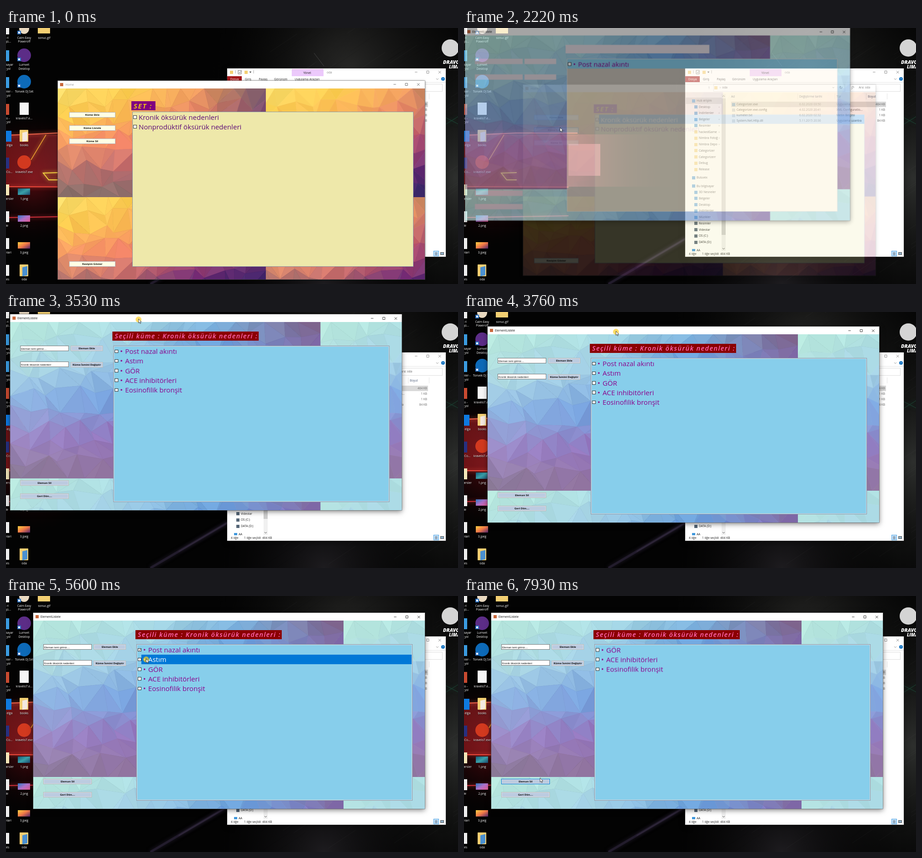
These frames come from a looping animation (995 by 563 pixels, 8 s). An HTML page with a canvas:

```html
<!DOCTYPE html>
<html lang="tr">
<head>
<meta charset="utf-8">
<title>Küme</title>
<style>
html, body { margin: 0; width: 100%; height: 100%; overflow: hidden; background: #000; }
div, canvas, svg { position: absolute; box-sizing: border-box; }
svg { left: 0; top: 0; overflow: visible; fill: none; }
#stage { left: 0; top: 0; width: 995px; height: 563px; overflow: hidden; font: 6.5px "Open Sans", "Noto Sans", sans-serif; color: #222; }
.text { white-space: pre; line-height: 0; }
.center { transform: translateX(-50%); }
.right { transform: translateX(-100%); }
.desk { color: #fff; text-shadow: 0 1px 1px #000; }
.shadow { box-shadow: 0 3px 11px rgba(0,0,0,.5), 0 0 0 .5px #666; }
.button { border: 1px solid #b9b9b9; box-shadow: inset 0 0 0 .5px #eee; font-weight: 700; font-size: 6px; color: #111; }
.field { background: #fff; border: 1px solid #777; font: 6px "Liberation Sans", sans-serif; color: #111; }
.focus { border: 1.5px solid #0078d7; }
.list { overflow: hidden; font-size: 15.1px; }
.tick { background: #fff; border: 1px solid #333; }
.banner { font-style: italic; font-weight: 600; }
</style>
</head>
<body>
<div id="stage"></div>
<script>
const LOOP = 8000, HOLD = 77;
const stage = document.getElementById('stage');

function box(parent, x, y, w, h, css = '', cls = '') {
  const el = document.createElement('div');
  el.className = cls;
  el.style.cssText = `left:${x}px;top:${y}px;width:${w}px;height:${h}px;${css}`;
  parent.append(el);
  return el;
}
function text(parent, x, y, str, css = '', cls = '') {
  const el = document.createElement('div');
  el.className = 'text ' + cls;
  el.style.cssText = `left:${x}px;top:${y}px;${css}`;
  el.textContent = str;
  parent.append(el);
  return el;
}
function shape(parent, x, y, d, css) {
  const el = box(parent, x, y, 1, 1);
  el.innerHTML = `<svg width="1" height="1"><path d="${d}" style="${css}"/></svg>`;
  return el;
}
function canvas(parent, x, y, w, h) {
  const el = document.createElement('canvas');
  el.width = w; el.height = h;
  el.style.cssText = `left:${x}px;top:${y}px`;
  if (parent) parent.append(el);
  return el.getContext('2d');
}

function track(el, frames) {
  el.animate(frames.map(([time, props], i) => {
    const next = frames[i + 1];
    const steps = next ? Math.max(1, Math.round((next[0] - time) / HOLD)) : 1;
    return { ...props, offset: time / LOOP, easing: `steps(${steps})` };
  }), { duration: LOOP, iterations: Infinity });
}
function during(el, ...spans) {
  const inside = time => +spans.some(([from, to]) => time >= from && time < to);
  const times = [...new Set([0, ...spans.flat(), LOOP])];
  el.animate(times.map(time => ({ opacity: inside(time), offset: time / LOOP, easing: 'step-end' })),
    { duration: LOOP, iterations: Infinity });
  return el;
}

function random(seed) {
  return () => (seed = (seed * 16807) % 2147483647) / 2147483647;
}
const rgb = hex => [1, 3, 5].map(i => parseInt(hex.slice(i, i + 2), 16));
const mix = (a, b, k) => a.map((v, i) => v + (b[i] - v) * k);

function sample(rows, u, v) {
  const fx = u * (rows[0].length - 1), fy = v * (rows.length - 1);
  const x = Math.min(Math.floor(fx), rows[0].length - 2), y = Math.min(Math.floor(fy), rows.length - 2);
  const across = row => mix(row[x], row[x + 1], fx - x);
  return mix(across(rows[y]), across(rows[y + 1]), fy - y);
}
function lowPoly(w, h, cell, palette, seed) {
  const g = canvas(null, 0, 0, w, h), rnd = random(seed);
  const rows = palette.map(line => line.split(' ').map(rgb));
  const nx = Math.round(w / cell), ny = Math.round(h / cell);
  const jitter = (i, n) => (i + (i > 0 && i < n ? (rnd() - .5) * .8 : 0)) / n;
  const grid = Array.from({ length: ny + 1 }, (_, j) =>
    Array.from({ length: nx + 1 }, (_, i) => [jitter(i, nx) * w, jitter(j, ny) * h]));
  const triangle = pts => {
    const [cx, cy] = [0, 1].map(k => pts.reduce((s, p) => s + p[k], 0) / 3);
    const shade = (rnd() - .5) * 13;
    g.fillStyle = g.strokeStyle = `rgb(${sample(rows, cx / w, cy / h).map(c => Math.round(c + shade))})`;
    g.beginPath();
    pts.forEach(p => g.lineTo(...p));
    g.closePath(); g.fill(); g.lineWidth = .7; g.stroke();
  };
  for (let j = 0; j < ny; j++) for (let i = 0; i < nx; i++) {
    const a = grid[j][i], b = grid[j][i + 1], c = grid[j + 1][i + 1], d = grid[j + 1][i];
    const halves = rnd() < .5 ? [[a, b, c], [a, c, d]] : [[a, b, d], [b, c, d]];
    halves.forEach(triangle);
  }
  return g.canvas;
}

function captionButtons(parent, x, y, color) {
  return shape(parent, x, y, 'M0 3h5.5M26 .5h5v5h-5zM52 .5l5.5 5.5m0-5.5l-5.5 5.5', `stroke:${color};stroke-width:.8`);
}
function button(parent, x, y, w, h, label, bg) {
  const el = box(parent, x, y, w, h, `background:${bg}`, 'button');
  text(el, w / 2 - 1, h / 2 - 1, label, '', 'center');
  return el;
}
function checkList(parent, x, y, w, h, css, items) {
  const list = box(parent, x, y, w, h, css, 'list');
  const body = box(list, 0, 0, w, h);
  const rows = items.map((item, i) => {
    const top = i * 21.25;
    text(body, 13, top + 10.5, item);
    const high = box(body, 9, top, w - 11, 21.25, 'background:#0078d7;color:#fff;opacity:0');
    text(high, 4, 10.5, item);
    box(body, 1, top + 7, 7.5, 7.5, '', 'tick');
    const check = shape(body, 2.5, top + 8.5, 'M.5 2.3l1.5 1.5 3-3.3', 'stroke:#222;stroke-width:1');
    check.style.opacity = 0;
    return { high, check };
  });
  return { body, rows };
}

function wallpaper() {
  const g = canvas(stage, 0, 0, 995, 563), rnd = random(7);
  const glow = (x, y, r, color) => {
    const grad = g.createRadialGradient(x, y, 0, x, y, r);
    grad.addColorStop(0, color); grad.addColorStop(1, 'transparent');
    g.fillStyle = grad; g.fillRect(0, 0, 995, 563);
  };
  const line = (color, width, ...pts) => {
    g.strokeStyle = g.shadowColor = color; g.lineWidth = width;
    g.beginPath(); pts.forEach(p => g.lineTo(...p)); g.stroke();
  };
  g.fillStyle = '#030303'; g.fillRect(0, 0, 995, 563);
  glow(760, 95, 340, 'rgba(56,56,54,.8)');
  glow(990, 330, 400, 'rgba(56,58,56,.8)');
  glow(700, 563, 260, 'rgba(36,34,38,.8)');
  for (let i = 0; i < 150; i++) {
    const x = 560 + rnd() * 480, y = rnd() * 563;
    line(`rgba(${rnd() < .5 ? '0,0,0' : '130,130,130'},.07)`, 1, [x, y], [x + 60, y - 40]);
  }
  line('rgba(150,150,150,.3)', 1, [678, 55], [700, 84]);
  glow(60, 330, 160, 'rgba(120,14,22,.7)');
  const band = g.createLinearGradient(0, 0, 480, 0);
  band.addColorStop(0, 'rgba(150,26,30,.65)');
  band.addColorStop(.5, 'rgba(150,50,60,.6)');
  band.addColorStop(1, 'transparent');
  g.fillStyle = band; g.fillRect(0, 234, 480, 115);
  g.fillStyle = '#a04858'; g.fillRect(230, 255, 70, 70);
  g.shadowBlur = 9;
  line('#f0644a', 2, [0, 236], [114, 231], [250, 231]);
  line('#f04a3c', 2, [0, 349], [230, 350]);
  line('#d0303a', 2, [0, 417], [230, 413]);
  line('#e8a030', 1.5, [55, 290], [88, 235]);
  line('#f0d040', 2, [116, 318], [82, 319], [94, 334], [116, 334]);
  line('#221c2c', 5, [318, 563], [490, 462]);
  line('#3c3248', 1, [380, 527], [490, 462]);
  line('#1c4636', 1, [966, 213], [995, 195]);
  line('#1c4636', 1, [966, 196], [995, 211]);
  box(stage, 959, 25, 38, 38, 'background:#d4d4d4;border-radius:50%');
  text(stage, 962, 75, 'DRAVONI', 'font:italic 800 11px/0 "Open Sans",sans-serif', 'desk');
  text(stage, 975, 85, 'LIMA', 'font:italic 800 10px/0 "Open Sans",sans-serif', 'desk');
}

function desktopIcons() {
  const folder = (x, y, inner) => {
    box(stage, x - 10, y - 13, 19, 26, 'background:#f3cf72;border-radius:1px');
    box(stage, x - 4, y - 8, 11, 20, `background:${inner};transform:skewY(-12deg)`);
  };
  const round = (y, color) => box(stage, 25, y - 15, 30, 30, `background:${color};border-radius:50%`);
  const thumb = (y, colors) => box(stage, 26, y - 7, 27, 14, `background:linear-gradient(150deg,${colors})`);
  box(stage, 29, -11, 22, 24, 'background:#e8d8c0;border-radius:50%');
  box(stage, 70, -8, 27, 20, 'background:#f3cf72');
  round(60, '#5c2d87');
  round(118, '#0d6ab8');
  box(stage, 30, 164, 20, 27, 'background:#f6f6f6');
  folder(40, 237, '#f4e8e0');
  round(295, '#d2391f');
  thumb(360, '#155a78,#3aa0a8,#1c4a70');
  thumb(419, '#2a78c0,#b070c8,#e05a90');
  thumb(478, '#fbd040,#f07848,#50246a');
  folder(40, 533, '#4a90d0');
  const labels = [[22, 'Calm Easy'], [30, 'Poweroff'], [81, 'Lumvet'], [89.5, 'Desktop'], [140, 'Tonvek DJ Set'],
    [199, 'kravelo7.e...'], [258, 'books'], [317, 'kravelo7.exe'], [376, '1.png'], [435, '2.png'], [494, '3.jpeg'], [553, 'oda']];
  labels.forEach(([y, s]) => text(stage, 40, y, s, '', 'desk center'));
  text(stage, 84, 22, 'sonuc.gif', '', 'desk center');
  const cut = [[22, 6, 'ri'], [30, 11, 'şü...'], [81, 16, 'sayar'], [89.5, 10, 'yol'], [140, 14, 'nler -'], [149, 10, 'yol'],
    [199, 8, 'o -'], [207, 10, 'yol'], [258, 14, 'elga'], [317, 14, 'Co...'], [376, 17, 'ersler'], [435, 5, 'le'], [494, 12, 'nlari'], [553, 7, 'es']];
  cut.forEach(([y, x, s]) => text(stage, x, y, s, '', 'desk right'));
  ['#eee', '#3a9be0', '#3a9be0', '#c84a30', '#0e7ae0', '#283080', '#f3e6b8', '#eee', '#eee', '#eee'].forEach((color, i) =>
    box(stage, -14, -10 + i * 59, i === 4 ? 26 : 21, 24, `background:${color}`));
  [11, 70, 128].forEach(y => box(stage, 25, y - 5, 8, 8, 'background:#fff;border:2px solid #2a70c0'));
}

function explorer() {
  const win = box(stage, 487, 89, 481, 414, 'background:#fff', 'shadow');
  const tab = (x, str, color = '#333') => text(win, x, 24, str, `color:${color}`, 'center');
  const icon = (x, y, color) => box(win, x - 3.5, y - 3.5, 7, 7, `background:${color}`);
  const rect = (x, y, w, h, css) => box(win, x, y, w, h, css);
  icon(9, 8, '#f3cf72'); icon(41, 8, '#f3cf72');
  shape(win, 24, 4, 'M0 0h7v8h-7zM2 4l1.5 2 3-4', 'stroke:#555;stroke-width:.8');
  shape(win, 49, 7, 'M0 0l2 2.5 2-2.5zM-31-3v7M9-3v7', 'stroke:#555;fill:#333;stroke-width:.5');
  rect(142, 1, 70, 16, 'background:#ecc9fb');
  text(win, 176, 9.5, 'Yönet', '', 'center');
  text(win, 219, 8.5, 'oda', 'color:#888');
  captionButtons(win, 413, 5, '#777');
  rect(0, 17, 32, 13, 'background:#a3181b');
  tab(16, 'Dosya', '#fff'); tab(46, 'Giriş'); tab(79, 'Paylaş'); tab(118, 'Görünüm'); tab(176, 'Uygulama Araçları');
  shape(win, 460, 22, 'M0 0l2.5 2.5 2.5-2.5', 'stroke:#777;stroke-width:.8');
  rect(471, 19, 8, 8, 'background:#0e70c0;border-radius:50%');
  text(win, 475, 23.5, '?', 'color:#fff', 'center');
  rect(0, 30, 481, 1, 'background:#e4e4e4');
  rect(62, 34, 290, 16.5, 'border:1px solid #ddd');
  rect(363, 34, 111, 16.5, 'border:1px solid #ddd');
  text(win, 50, 42, '↑', 'font-size:9px;color:#555');
  icon(67, 42, '#f3cf72');
  text(win, 76, 42, '›  oda');
  shape(win, 324, 41, 'M0 0l2 2 2-2M44 2l-2 3M44 2a2 2 0 1 1 2 0', 'stroke:#666;stroke-width:.8');
  text(win, 339, 42, '↻', 'font-size:9px');
  text(win, 382, 42, 'Ara: oda', 'color:#666');
  [[101, 'Ad'], [251, 'Değiştirme tarihi'], [333, 'Tür'], [402, 'Boyut']].forEach(([x, s]) => text(win, x, 62, s, 'color:#4a5a78'));
  [247, 329, 398, 444].forEach(x => rect(x, 55, 1, 13, 'background:#e6e6e6'));
  rect(101, 73, 341, 12, 'background:#d9d9d9');
  const files = [['Categorizer.exe', '6.02.2020 03:50', 'Uygulama', '464 KB'], ['Categorizer.exe.config', '4.02.2020 20:41', 'XML Configuratio...', '1 KB'],
    ['kumeler.txt', '6.02.2020 02:32', 'Metin Belgesi', '1 KB'], ['System.Net.Http.dll', '5.11.2015 20:36', 'Uygulama uzantısı', '84 KB']];
  files.forEach(([name, date, kind, size], i) => {
    const y = 79 + i * 12, grey = 'color:#666';
    icon(106, y, i ? '#c4cfda' : '#6a9ac8');
    text(win, 113, y, name); text(win, 251, y, date, grey);
    text(win, 333, y, kind, grey); text(win, 440, y, size, grey, 'right');
  });
  rect(1, 64, 79, 14, 'background:#dcdcdc');
  const groups = [[71, 'Hızlı erişim,Desktop,İndirilenler,Belgeler,Resimler,hackedGame,Nimbra Fotoğ,Nimbra Depo,Categorizer,Categorizerr,Debug,Release'],
    [240, 'Buluvex'], [258.5, 'Bu bilgisayar,3D Nesneler,Belgeler,Desktop,İndirilenler,Müzikler,Resimler,Videolar,OS (C:),DATA (D:)'], [400, 'AA']];
  groups.forEach(([top, names], g) => names.split(',').forEach((name, i) => {
    const y = top + i * 13.73, x = i ? 30 : 25;
    icon(x - 7, y, g === 0 && i > 4 ? '#f3cf72' : i > 5 ? '#567' : '#3f97dc');
    text(win, x, y, name);
    if (g === 0 && i > 0 && i < 8) text(win, 73, y, '⌖', 'color:#999;font-size:6px');
  }));
  rect(0, 401.5, 481, 12, 'background:#fff');
  rect(80, 56, 9, 345, 'background:#f0f0f0');
  rect(80, 66, 9, 300, 'background:#cdcdcd');
  shape(win, 82, 395, 'M0 0l2.5 2.5 2.5-2.5M0-333l2.5-2.5 2.5 2.5', 'stroke:#555;stroke-width:1');
  text(win, 8, 407.5, '4 öğe');
  text(win, 37, 407.5, '1 öğe seçildi  464 KB');
  rect(454, 401, 12, 12, 'background:#cce8ff;border:1px solid #4aa0e0');
  shape(win, 457, 404, 'M0 1h6M0 3.5h6M0 6h6', 'stroke:#456;stroke-width:1');
  rect(469, 404, 8, 6, 'background:#8fb0c8;border:1px solid #555');
}

// Title bar plus tiled low-poly client area; the hole keeps the list area see-through.
function formWindow(w, h, tile, hole) {
  const win = box(stage, 0, 0, w, h);
  const glow = box(win, 0, 0, w, h, '', 'shadow');
  box(win, 0, 0, w, 17, 'background:#fff');
  box(win, 5, 5, 7, 7, 'background:#c9683c');
  const g = canvas(win, 0, 17, w, h - 17);
  g.fillStyle = g.createPattern(tile, 'repeat');
  g.fillRect(0, 0, w, h);
  if (hole) g.clearRect(...hole);
  return { win, glow };
}

function homeWindow() {
  const tile = lowPoly(458, 239, 33, [
    '#fbe274 #fcd04e #f3a25e #70586c', '#fcd04c #fdb857 #e58064 #7a4a72', '#fa9f66 #f6866a #b8506e #6c3274',
    '#c07a70 #b8686e #752c76 #45286f', '#7e6c68 #86706a #34286a #2a2660'], 41);
  const { win, glow } = formWindow(808, 437, tile);
  win.style.left = '114px'; win.style.top = '116px';
  glow.style.boxShadow = '0 1px 5px rgba(0,0,0,.5), 0 0 0 .5px #777';
  during(box(win, 0, 0, 808, 437, 'z-index:-1', 'shadow'), [1210, LOOP]);
  during(text(win, 17, 8.5, 'Home', 'color:#999'), [0, 1210]);
  during(text(win, 17, 8.5, 'Home', 'color:#111'), [1210, LOOP]);
  during(captionButtons(win, 739, 5, '#555'), [0, 2050]);
  const label = box(win, 162, 45, 53, 20, 'background:#800080;color:#ffe600', 'banner');
  text(label, 5, 10, 'SET :', 'font-size:15px;letter-spacing:2px');
  const cream = '#ffffe4';
  button(win, 25, 68.5, 102, 12, 'Küme Ekle', cream);
  button(win, 25, 97.5, 102, 12, 'Küme Listele', cream);
  button(win, 25, 126.5, 102, 12, 'Küme Sil', cream);
  button(win, 25, 397, 102, 12, 'Kesişim Göster', cream);
  during(box(win, 25, 97.5, 102, 12, '', 'focus'), [1750, LOOP]);
  const { rows } = checkList(win, 164, 68, 619, 341, 'background:#eee8aa;border:1px solid #8a98a8;color:#5b0a78',
    ['Kronik öksürük nedenleri', 'Nonprodüktif öksürük nedenleri']);
  during(rows[0].high, [1210, LOOP]);
  during(rows[0].check, [1360, LOOP]);
  const pose = (opacity, scale) => ({ opacity, transform: `scale(${scale})` });
  track(win, [[0, pose(1, 1)], [2139, pose(1, 1)], [2140, pose(.6, .98)], [2220, pose(.22, .96)],
    [2300, pose(0, .95)], [LOOP, pose(0, .95)]]);
}

function elementWindow() {
  const tile = lowPoly(683, 344, 38, [
    '#bdeee0 #b0e2e4 #7fb4dd #7b5a80', '#b5e2e4 #9fcbe6 #5f96dc #8a70b8', '#92b8e4 #74a0de #7a8ad0 #9a6ab4',
    '#a08ac8 #9678c0 #9468b4 #8a5c98', '#8c7c94 #8f7098 #8a6890 #7a5c80'], 97);
  const { win, glow } = formWindow(862, 431, tile, [229, 53, 604, 340]);
  glow.style.clipPath = 'polygon(evenodd,-20px -20px,882px -20px,882px 451px,-20px 451px,-20px -20px,0 0,862px 0,862px 431px,0 431px,0 0)';
  text(win, 16, 8.5, 'ElementListele', 'color:#111');
  captionButtons(win, 794, 5.5, '#111');

  const blank = during(box(win, 0, 0, 862, 431), [2140, 2300]);
  [[225, 38, 322, 19], [22, 69, 107, 12], [133, 69, 71, 12], [22, 104, 107, 12], [133, 104, 71, 12], [22, 364, 107, 12], [22, 394, 107, 12]]
    .forEach(r => box(blank, ...r, 'background:#e6dfe6'));
  checkList(blank, 228, 69, 606, 342, 'background:linear-gradient(#87ceeb 21px,rgba(255,248,236,.8) 21px);border:1px solid #ddd;color:#8b008b',
    ['•\u200a Post nazal akıntı']);

  const ui = during(box(win, 0, 0, 862, 431), [2300, LOOP]);
  const banner = box(ui, 225, 37.5, 322, 20, 'background:#8b0000;color:#ff69b4', 'banner');
  text(banner, 5, 10, 'Seçili küme : Kronik öksürük nedenleri :', 'font-size:14.5px;letter-spacing:1.4px');
  [[69, 'Eleman ismi giriniz....'], [104, 'Kronik öksürük nedenleri']].forEach(([y, s]) =>
    text(box(ui, 22, y, 107, 12, '', 'field'), 1, 5.5, s));
  const steel = '#bccbe0';
  button(ui, 133, 69, 71, 12, 'Eleman Ekle', steel);
  button(ui, 133, 105, 71, 12, 'Küme İsmini Değiştir', steel);
  button(ui, 22, 364.5, 107, 12, 'Eleman Sil', steel);
  button(ui, 22, 394, 107, 12, 'Geri Dön....', steel);
  during(box(ui, 22, 364.5, 107, 12, '', 'focus'), [7320, LOOP]);
  const { body, rows } = checkList(ui, 228, 69.5, 606, 342, 'background:#87ceeb;border:1px solid #d4dce4;outline:.5px solid #8a98a8;color:#8b008b',
    ['Post nazal akıntı', 'Astım', 'GÖR', 'ACE inhibitörleri', 'Eosinofilik bronşit'].map(s => '•\u200a ' + s));
  during(rows[0].high, [4530, 5370]);
  during(rows[0].check, [4830, LOOP]);
  during(rows[1].high, [5370, 7700]);
  during(rows[1].check, [5680, LOOP]);
  const shift = y => ({ transform: `translateY(${y}px)` });
  track(body, [[0, shift(0)], [7699, shift(0)], [7700, shift(-42.5)], [LOOP, shift(-42.5)]]);

  const pose = (x, y, opacity = 1, scale = 1) => ({ opacity, transform: `translate(${x}px,${y}px) scale(${scale})` });
  track(win, [[0, pose(-5, -4, 0, .97)], [2139, pose(-5, -4, 0, .97)], [2140, pose(-5, -4, .35, .97)],
    [2220, pose(-5, -4, .64, .983)], [2300, pose(-5, -4, .88, .995)], [2370, pose(-5, -4)], [3450, pose(-5, -4)],
    [3760, pose(52, 32)], [3900, pose(60, 37)], [LOOP, pose(60, 37)]]);
}

function pointer() {
  const el = box(stage, 0, 0, 1, 1);
  const disc = box(el, -6.5, -5.5, 13, 13, 'background:rgba(255,205,30,.68);border-radius:50%');
  during(disc, [1210, 1290], [1360, 1440], [1900, 1980], [3370, 3980], [4530, 4600], [4760, 4840], [5370, 5450], [5600, 5680], [7620, 7850]);
  const arrow = shape(el, 0, 0, 'M.5 0v9.2l2.1-1.9 1.5 3.3 1.4-.6-1.5-3.3h2.8z', 'fill:#fff;stroke:#111;stroke-width:.7');
  during(arrow, [210, LOOP]);
  const stops = [[0, 823, 500], [210, 823, 500], [980, 350, 193], [1060, 338, 194], [1210, 284, 196], [1440, 284, 196],
    [1750, 211, 219], [2230, 211, 219], [2370, 213, 221], [2680, 263, 163], [2990, 263, 161], [3370, 277, 6], [3450, 277, 6],
    [3760, 334, 42], [3900, 342, 47], [3980, 342, 47], [4300, 312, 117], [4840, 312, 117], [5070, 309, 136], [5220, 308, 138],
    [6000, 308, 138], [6380, 186, 146], [6780, 205, 196], [6850, 207, 200], [7200, 166, 428], [7320, 167, 400], [LOOP, 167, 400]];
  track(el, stops.map(([time, x, y]) => [time, { transform: `translate(${x}px,${y}px)` }]));
}

wallpaper();
desktopIcons();
explorer();
homeWindow();
elementWindow();
pointer();
</script>
</body>
</html>
```
